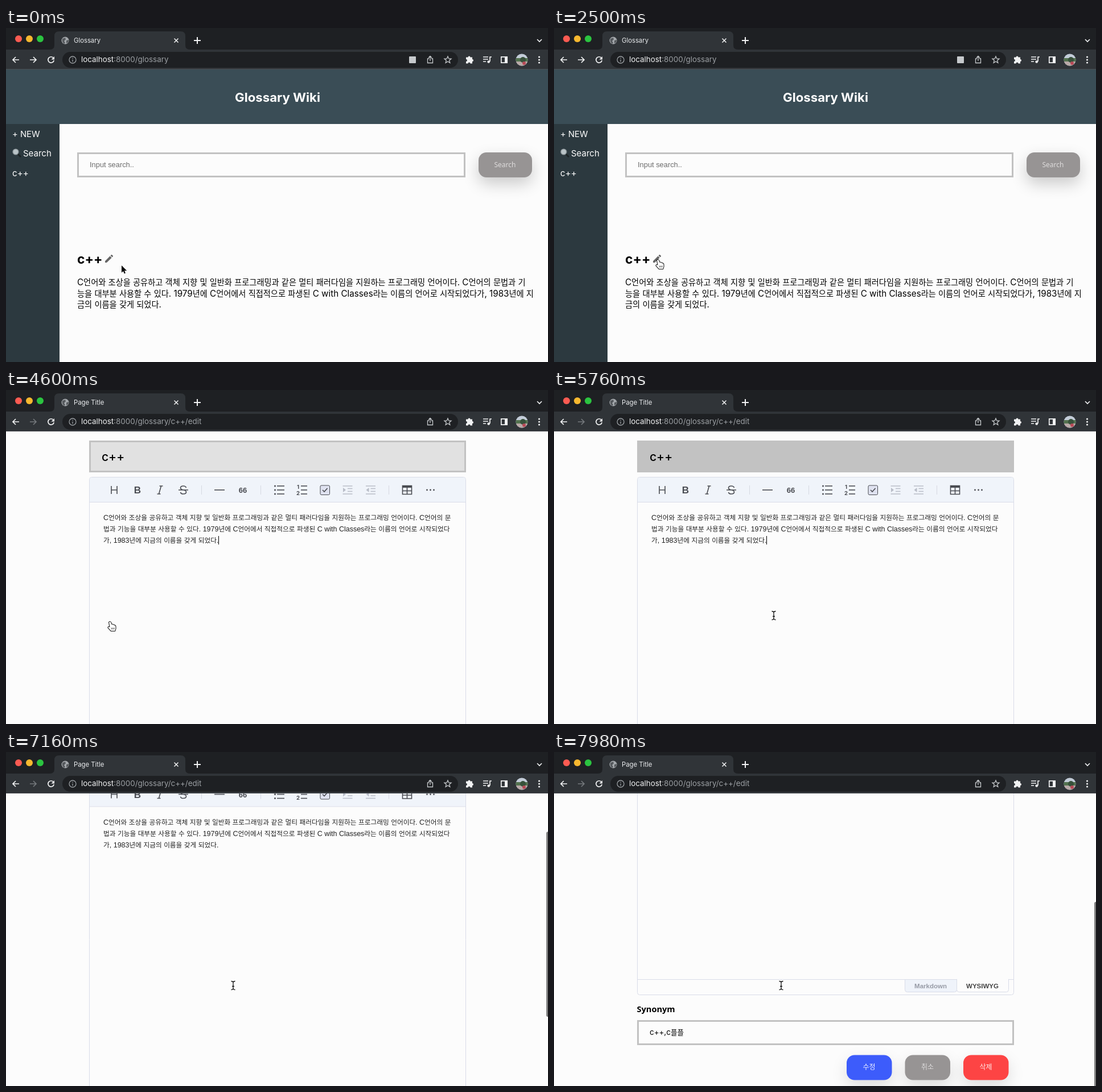
Recreate the animation shown at these times as an HTML page with a canvas. Size 952x588 px, loop 8000 ms.

```html
<!DOCTYPE html>
<html lang="ko">
<head>
<meta charset="utf-8">
<title>Glossary</title>
<style>
html, body { margin: 0; width: 100%; height: 100%; overflow: hidden; background: #fcfcfc; }
canvas { display: block; width: 952px; height: 588px; }
</style>
</head>
<body>
<canvas id="stage" width="952" height="588"></canvas>
<script>
const ctx = document.getElementById('stage').getContext('2d');
const LOOP = 8000, W = 952, H = 588, TOP = 73;
const EDIT_AT = 4250, FADE_AT = 4450, SCROLL_MAX = 298;
const SANS = 'Inter, sans-serif';
const ARIAL = '"Liberation Sans", Arial, sans-serif';
const HANGUL = '"Noto Sans CJK KR", "Noto Sans CJK", sans-serif';
const PAPER = '#fcfcfc', BAR = '#303438', DARK = '#1e2023', RULE = '#d9dce8';

// ---------- drawing helpers ----------
function text(str, x, y, size, color, weight = 400, family = SANS, align = 'left') {
  ctx.font = `${weight} ${size}px ${family}`;
  ctx.textAlign = align;
  ctx.fillStyle = color;
  ctx.fillText(str, x, y);
  return ctx.measureText(str).width;
}
// Hangul runs are set slightly smaller than the Latin around them.
function mixed(str, x, y, size, color, family) {
  for (const run of str.match(/[가-힣]+|[^가-힣]+/g)) {
    x += /[가-힣]/.test(run)
      ? text(run, x, y, size * 0.935, color, 400, HANGUL)
      : text(run, x, y, size, color, 400, family);
  }
  return x;
}
function rect(x, y, w, h, fill) {
  ctx.fillStyle = fill;
  ctx.fillRect(x, y, w, h);
}
function round(x, y, w, h, r, fill, stroke) {
  ctx.beginPath();
  ctx.roundRect(x, y, w, h, r);
  if (fill) { ctx.fillStyle = fill; ctx.fill(); }
  if (stroke) { ctx.strokeStyle = stroke; ctx.lineWidth = 1; ctx.stroke(); }
}
function disc(x, y, r, fill) {
  ctx.fillStyle = fill;
  ctx.beginPath();
  ctx.arc(x, y, r, 0, 7);
  ctx.fill();
}
function line(d, x, y, color, width = 1.5) {
  ctx.save();
  ctx.translate(x, y);
  ctx.strokeStyle = color;
  ctx.lineWidth = width;
  ctx.stroke(new Path2D(d));
  ctx.restore();
}
function shape(d, x, y, fill, scale = 1, stroke, width = 1) {
  const p = new Path2D(d);
  ctx.save();
  ctx.translate(x, y);
  ctx.scale(scale, scale);
  if (stroke) { ctx.strokeStyle = stroke; ctx.lineWidth = width; ctx.lineJoin = 'round'; ctx.stroke(p); }
  ctx.fillStyle = fill;
  ctx.fill(p);
  ctx.restore();
}
function field(x, y, w, h, fill) {
  rect(x, y, w, h, '#c2c2c2');
  rect(x + 3, y + 3, w - 6, h - 6, fill);
}
function button(x, y, w, h, fill, shadow) {
  ctx.save();
  ctx.shadowColor = shadow;
  ctx.shadowBlur = 28;
  ctx.shadowOffsetY = 11;
  round(x, y, w, h, 14, fill);
  ctx.restore();
}

// ---------- motion helpers ----------
const clamp = v => Math.max(0, Math.min(1, v));
const smooth = v => v * v * (3 - 2 * v);
function track(keys, t) {
  let i = 0;
  while (i < keys.length - 2 && t > keys[i + 1][0]) i++;
  const [a, b] = [keys[i], keys[i + 1]];
  const k = smooth(clamp((t - a[0]) / (b[0] - a[0])));
  return a.slice(1).map((v, j) => v + (b[j + 1] - v) * k);
}
const POINTER = [[0, 203, 418], [1000, 203, 418], [1380, 196, 414], [2500, 183, 409],
  [4900, 183, 409], [5600, 386, 397], [6100, 386, 397], [6600, 399, 411]];
const SCROLL = [[6750, 0], [7450, 168], [7950, SCROLL_MAX]];
function scrollAt(t) {
  if (t < 6750) return 0;
  if (t < 7160) return 101 * clamp((t - 6750) / 410) ** 1.5;
  const k = clamp((t - 7160) / 740);
  return 101 + (SCROLL_MAX - 101) * (1 - (1 - k) ** 1.7);
}

// ---------- browser window ----------
function browser(edit) {
  const ink = '#f1f2f3', soft = '#9b9fa3', mid = '#c6c9cc';
  rect(0, 0, W, TOP, DARK);
  rect(0, 38, W, 34, BAR);
  rect(0, 72, W, 1, '#4a4e52');
  ['#fc5b52', '#f7b82f', '#2bc440'].forEach((c, i) => disc(22 + 19 * i, 19, 6, c));
  shape('M77 38Q85 38 85 30V14Q85 6 93 6H307Q315 6 315 14V30Q315 38 323 38Z', 0, 0, BAR);
  disc(104, 22, 6.5, '#a3a7ab');
  shape('M-5 -3L0 -5L1 -2L-2 1L0 4L-2 6Q-6 3 -5 -3ZM2 0L6 -1Q6 4 2 5Z', 104, 22, '#55595d');
  text(edit ? 'Page Title' : 'Glossary', 119, 26, 11.3, '#eceef0');
  line('M-3.5 -3.5L3.5 3.5M3.5 -3.5L-3.5 3.5', 299, 22, ink, 1.5);
  line('M-6 0H6M0 -6V6', 336, 22, ink, 2);
  line('M-4 -2L0 2L4 -2', 937, 22, ink, 1.7);

  line('M6 0H-5M0 -5L-5 0L0 5', 17, 56, ink, 1.7);
  line('M-6 0H5M0 -5L5 0L0 5', 48, 56, edit ? '#74787c' : ink, 1.7);
  line('M4 -3.5A5.2 5.2 0 1 0 5.2 1', 79, 56, ink, 1.7);
  shape('M6 -6V-0.5H0.5Z', 79, 56, ink);
  round(99, 42, 695, 28, 14, DARK);
  line('M6 0A6 6 0 1 1 -6 0A6 6 0 1 1 6 0M0 -0.5V3.5M0 -3.5V-2', 117, 56, soft, 1.3);
  const x = 132 + text('localhost', 132, 60, 13.4, ink);
  text(':8000/glossary' + (edit ? '/c++/edit' : ''), x, 60, 13.4, soft);
  if (!edit) round(708, 50, 12, 12, 1, mid);
  line('M-2 -2H-4.5V5.5H4.5V-2H2M0 2V-6M-3 -3.5L0 -6.5L3 -3.5', 745, 56, mid, 1.3);
  line('M0 -6L1.7 -2L6 -1.7L2.7 1.1L3.8 5.4L0 3L-3.8 5.4L-2.7 1.1L-6 -1.7L-1.7 -2Z', 776, 56, mid, 1.3);
  shape('M-6 -4H-2.5A2 2 0 1 1 1.5 -4H5V-0.5A2 2 0 1 1 5 3.5V7H1.5A2 2 0 0 0 -2.5 7H-6V3.5A2 2 0 0 0 -6 -0.5Z', 814, 55.5, ink);
  line('M-7 -5H2M-7 -1H2M-7 3H-2M5 3V-5H8', 845, 56, ink, 1.7);
  disc(843 + 4.7, 59.5, 2.3, ink);
  line('M-5.2 -5.2H5.2V5.2H-5.2Z', 875, 56, ink, 1.7);
  rect(876, 50, 5, 12, ink);
  avatar(906, 56);
  [-5, 0, 5].forEach(d => disc(936.5, 56 + d, 1.6, ink));
}
function avatar(x, y) {
  ctx.save();
  ctx.beginPath();
  ctx.arc(x, y, 10.5, 0, 7);
  ctx.clip();
  rect(x - 11, y - 11, 22, 22, '#c3ccd8');
  rect(x - 11, y - 3, 22, 6, '#53724f');
  rect(x - 11, y + 3, 22, 8, '#b9a9a8');
  disc(x + 2, y, 5, '#38513b');
  disc(x + 4, y + 6, 3, '#b84a57');
  ctx.restore();
}

// ---------- pages ----------
const WIKI = [
  'C언어와 조상을 공유하고 객체 지향 및 일반화 프로그래밍과 같은 멀티 패러다임을 지원하는 프로그래밍 언어이다. C언어의 문법과 기',
  '능을 대부분 사용할 수 있다. 1979년에 C언어에서 직접적으로 파생된 C with Classes라는 이름의 언어로 시작되었다가, 1983년에 지',
  '금의 이름을 갖게 되었다.'];
const DRAFT = [
  'C언어와 조상을 공유하고 객체 지향 및 일반화 프로그래밍과 같은 멀티 패러다임을 지원하는 프로그래밍 언어이다. C언어의 문',
  '법과 기능을 대부분 사용할 수 있다. 1979년에 C언어에서 직접적으로 파생된 C with Classes라는 이름의 언어로 시작되었다',
  '가, 1983년에 지금의 이름을 갖게 되었다.'];

function wikiPage() {
  rect(0, TOP, W, 96, '#3a4d56');
  rect(0, 169, 94, H - 169, '#2c393f');
  text('Glossary Wiki', 477, 130, 22.2, '#fff', 700, SANS, 'center');
  text('+ NEW', 11, 192, 14.8, '#fff');
  line('M3 3L8 8', 18, 219, '#1c2224', 2.6);
  disc(17, 218, 5.6, '#8d979b');
  disc(17, 218, 4.2, '#b9c3c7');
  text('Search', 30, 225.5, 15, '#fff');
  text('c++', 11, 261, 15.2, '#fff');

  field(125, 219, 682, 44, PAPER);
  text('Input search..', 147, 245, 12.87, '#6c6c6c', 400, ARIAL);
  button(830, 219, 94, 44, '#979494', 'rgba(0,0,0,.2)');
  text('Search', 876.5, 244.5, 12, '#dedcdc', 400, '"Noto Sans", sans-serif', 'center');

  text('c++', 125, 414.5, 22.8, '#000', 700);
  shape('M3 17.25V21h3.75L17.81 9.94l-3.75-3.75zM20.71 7.04a1 1 0 0 0 0-1.41l-2.34-2.34a1 1 0 0 0-1.41 0l-1.83 1.83 3.75 3.75z',
    171.7, 396.7, '#666', 0.78);
  WIKI.forEach((s, i) => mixed(s, 125, 453 + 19.6 * i, 15.2, '#000', SANS));
}

function toolbar() {
  const ink = '#4a4c52', pale = '#b9bdc8', y = 176;
  line('M-5 -7V7M5 -7V7M-5 0H5', 190, y, ink, 1.6);
  text('B', 231, 182, 17, ink, 800, ARIAL, 'center');
  line('M-1 -7H5M-5 7H1M2 -7L-2 7', 270.5, y, ink, 1.6);
  line('M5 -4Q4 -7 0 -7Q-5 -7 -5 -3.5Q-5 -1 0 0Q5 1 5 3.5Q5 7 0 7Q-4.5 7 -5 4M-8.5 0H8.5', 311.5, y, ink, 1.6);
  [343.5, 447.5, 672.5].forEach(x => line('M0 -8V8', x, y, '#d6d9e2', 1));
  line('M-9 0H9', 375, y, ink, 1.6);
  text('66', 416, 181, 13, ink, 700, ARIAL, 'center');
  for (const d of [-7, 0, 7]) {
    disc(472.5, y + d, 1.5, ink);
    line('M-4 0H9', 480, y + d, ink, 1.6);
    line('M-2 0H9', 520, y + d, ink, 1.6);
  }
  text('1', 513, 174, 9.5, ink, 700, SANS, 'center');
  text('2', 513, 185, 9.5, ink, 700, SANS, 'center');
  round(552, 168, 16.5, 16.5, 2, '#dfe2f0', ink);
  line('M-4 0L-1 3L4.5 -3', 560, y, ink, 1.6);
  line('M-8.5 -7H8.5M0 -2.5H8.5M0 2.5H8.5M-8.5 7H8.5', 600, y, pale, 1.6);
  shape('M-8 -4L-3 0L-8 4Z', 600, y, pale);
  line('M-8.5 -7H8.5M0 -2.5H8.5M0 2.5H8.5M-8.5 7H8.5', 640.5, y, pale, 1.6);
  shape('M-3 -4L-8 0L-3 4Z', 640.5, y, pale);
  rect(696, 168, 17, 4, ink);
  line('M-8 -7.5H8V7.5H-8ZM0 -5V7M-8 1.5H8', 704.5, y, ink, 1.6);
  [-6, 0, 6].forEach(d => disc(745.5 + d, y, 1.4, ink));
}

function editPage(t) {
  const s = scrollAt(t);
  ctx.save();
  ctx.beginPath();
  ctx.rect(0, TOP, W, H - TOP);
  ctx.clip();
  ctx.translate(0, -s);

  const k = smooth(clamp((t - FADE_AT) / 320));
  const g = Math.round(252 - 58 * k);
  field(146, 89, 662, 56, `rgb(${g},${g},${g})`);
  text('c++', 168, 125, 21, '#000', 500);

  round(146.5, 153.5, 661, 572, 4, PAPER, RULE);
  round(147, 154, 660, 43, [4, 4, 0, 0], '#f0f4fa');
  rect(147, 197, 660, 1, RULE);
  toolbar();
  let end = 0;
  DRAFT.forEach((str, i) => { end = mixed(str, 171, 229 + 20 * i, 12.5, '#222', ARIAL); });
  if ((t - 4400) % 1000 < 500) rect(Math.round(end), 257, 1, 15, '#000');

  rect(147, 698, 660, 1, RULE);
  round(616.5, 698.5, 91, 22, [0, 0, 4, 4], '#eff3fa', RULE);
  rect(708, 698, 90, 1, PAPER);
  round(707.5, 698, 91, 22.5, [0, 0, 4, 4], PAPER, RULE);
  rect(708, 697, 90, 3, PAPER);
  text('Markdown', 661.5, 714, 11.5, '#979ba6', 700, ARIAL, 'center');
  text('WYSIWYG', 752.5, 714, 11.5, '#444', 700, ARIAL, 'center');

  text('Synonym', 145.5, 756, 14.6, '#000', 700, '"Noto Sans", sans-serif');
  field(146, 770, 662, 44, PAPER);
  mixed('c++,c플플', 168, 796, 13.4, '#000', SANS);
  [['수정', 514, '#3d5cfb', '#eef0ff'], ['취소', 616.5, '#979494', '#dedcdc'], ['삭제', 719, '#fd4444', '#ffeaea']]
    .forEach(([label, x, fill, ink]) => {
      button(x, 831.5, 79.5, 44, fill, 'rgba(0,0,0,.13)');
      text(label, x + 39.5, 857, 12, ink, 400, HANGUL, 'center');
    });
  ctx.restore();
  if (t > 6700) round(949, 76.4 + s * 0.629, 6, 326, 3, '#7d7d7d');
}

// ---------- pointer ----------
function pointer(t) {
  const [x, y] = track(POINTER, t);
  if (t > 4920) {
    const beam = 'M-3.5 -7.5Q0 -7.5 0 -5Q0 -7.5 3.5 -7.5M0 -5.5V5.5M-3.5 7.5Q0 7.5 0 5Q0 7.5 3.5 7.5M-2 1.5H2';
    line(beam, x, y, '#fff', 3);
    line(beam, x, y, '#111', 1.3);
  } else if (x < 189) {
    shape('M-2 0Q0 -2 1.3 0.5L2.6 4Q4 3 5 4.6Q6.4 3.8 7.2 5.4Q9 5 9.4 7L9.6 10.5L8.4 15H1.5L-3.5 9.6Q-4 7.6 -1.6 8L-0.4 9Z',
      x, y, '#fff', 1, '#111', 2);
    line('M2.6 9.5V12.5M4.8 9.5V12.5M7 9.5V12.5', x, y, '#111', 0.8);
  } else {
    shape('M0 0V12.8L2.9 10.1L4.8 14.5L6.9 13.6L5 9.3H9.2Z', x, y, '#000', 1, '#fff', 2);
  }
}

function draw(t) {
  const edit = t >= EDIT_AT;
  rect(0, 0, W, H, PAPER);
  if (edit) editPage(t); else wikiPage();
  browser(edit);
  pointer(t);
}
const start = performance.now();
function tick() {
  draw((performance.now() - start) % LOOP);
  requestAnimationFrame(tick);
}
draw(0);
requestAnimationFrame(tick);
</script>
</body>
</html>
```
